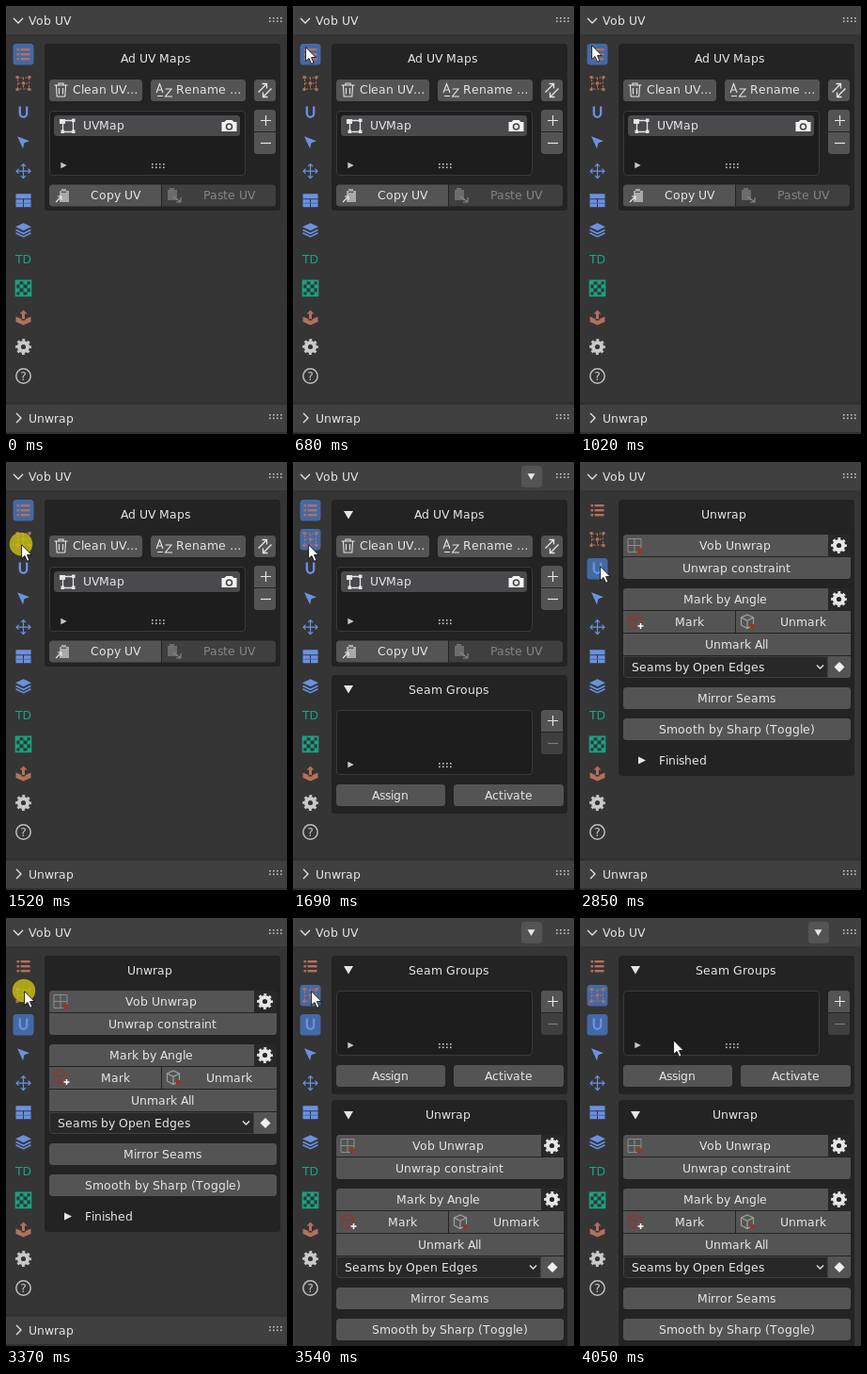
An HTML page that plays this animation: 299x454 px, repeating every 4.39 s.

```html
<!DOCTYPE html>
<html lang="en">
<head>
<meta charset="utf-8">
<title>UV panel</title>
<style>
  html, body { margin: 0; width: 100%; height: 100%; overflow: hidden; background: #353535; }
  svg { display: block; width: 100vw; height: 100vh; }
  text { font: 12.4px "DejaVu Sans", sans-serif; fill: #e6e6e6; white-space: pre; }
</style>
</head>
<body>
<svg id="stage" viewBox="0 0 299 454"></svg>
<script>
const LOOP = 4390;
const FG = '#e6e6e6', BTN = '#545454', OFF = '#3f3f3f', DARK = '#1d1d1d', HEAD = '#404040';
const ALL = 15, TOP = 3, BOTTOM = 12, LEFT = 9, RIGHT = 6, TL = 1, TR = 2, NONE = 0;

// Corner bits: 1 top left, 2 top right, 4 bottom right, 8 bottom left
function box(x, y, w, h, fill, corners = ALL, stroke = 'none') {
  const [a, b, c, d] = [1, 2, 4, 8].map(bit => corners & bit ? 3.5 : 0);
  return `<path fill="${fill}" stroke="${stroke}" d="M${x + a} ${y}H${x + w - b}q${b} 0 ${b} ${b}` +
    `V${y + h - c}q0 ${c} ${-c} ${c}H${x + d}q${-d} 0 ${-d} ${-d}V${y + a}q0 ${-a} ${a} ${-a}z"/>`;
}

// The interface font advances by whole pixels
const pen = document.createElement('canvas').getContext('2d');
pen.font = '12.4px "DejaVu Sans", sans-serif';
const advance = ch => Math.round(pen.measureText(ch).width);
const widthOf = s => [...s].reduce((sum, ch) => sum + advance(ch), 0);
function text(x, cy, s, fill = FG) {
  const xs = [...s].map(ch => (x += advance(ch)) - advance(ch));
  return `<text x="${xs.join(' ')}" y="${Math.round(cy + 4.5)}" style="fill:${fill}">${s}</text>`;
}
const mid = (x, cy, s, fill) => text(Math.floor(x - widthOf(s) / 2), cy, s, fill);
const glyph = (s, fill, font) =>
  `<text y="4.5" text-anchor="middle" style="fill:${fill};font:${font}">${s}</text>`;

const at = (x, y, s) => `<g transform="translate(${x} ${y})">${s}</g>`;
const line = (d, color = FG, w = 1.2) =>
  `<path d="${d}" fill="none" stroke="${color}" stroke-width="${w}"/>`;
const solid = (d, color = FG) => `<path d="${d}" fill="${color}"/>`;
const rect = (x, y, w, h, fill) => `<rect x="${x}" y="${y}" width="${w}" height="${h}" fill="${fill}"/>`;
const dot = (x, y, r, fill) => `<circle cx="${x}" cy="${y}" r="${r}" fill="${fill}"/>`;
const grid = (cols, rows, fn) => Array.from({ length: cols * rows },
  (_, i) => fn(i % cols, Math.floor(i / cols))).join('');

const btn = (x, y, w, label = '', corners = ALL, lx = x + w / 2) =>
  box(x, y, w, 23, BTN, corners) + mid(lx, y + 11, label);
const grip = (x, y) => grid(4, 2, (c, r) => rect(x + c * 4, y + r * 3.5, 1.6, 1.6, '#c4c4c4'));
const down = (x, y, s = 5) => solid(`M${x - s} ${y - s * .8}h${s * 2}l${-s} ${s * 1.7}z`);
const right = (x, y, s = 4, color = FG) => solid(`M${x - s} ${y - s}v${s * 2}l${s * 2} ${-s}z`, color);
const gear = (color = FG) =>
  `<g fill="none" stroke="${color}"><circle r="4.6" stroke-width="4"/>` +
  `<circle r="7.2" stroke-width="2.4" stroke-dasharray="2.9 2.755" stroke-dashoffset="1.4"/></g>`;
const gearBtn = y => box(264, y, 24, 23, '#282828', TR) + at(275.5, y + 11.5, gear());
const cube = color => line('M0-7 6.5-4V4L0 7.5-6.5 4V-4zM-6.5-4 0-.7 6.5-4M0-.7V7.5', color, 1.2);
const clip = color => solid('M-4-5H-2V-7H3V-5H6V7H-4z', color) +
  rect(-2, -4.3, 5, 1.3, '#505050') + line('M-8 7-2 1M-6 1h4v4', FG, 1.2);

function plusMinus(y, minusOn) {
  return box(264, y, 23, 23, BTN, TOP) + line(`M271 ${y + 11.5}h11M276.5 ${y + 6}v11`) +
    box(264, y + 24, 23, 23, minusOn ? BTN : OFF, BOTTOM) +
    line(`M271 ${y + 35.5}h11`, minusOn ? FG : '#7a7a7a');
}
const list = y => box(46.5, y + .5, 208, 68, DARK, ALL, '#3a3a3a') +
  right(61.5, y + 58, 3.2, '#c8c8c8') + grip(155, y + 56);
const panel = (y, h) => box(41, y, 251, h, '#232323');

const maps = panel(40, 177) +
  btn(46, 78, 99) + text(71, 88.5, 'Clean UV…') +
  at(58.5, 89, line('M-7-5H7M-2.5-5V-7H2.5V-5M-5-4.5-4.3 7H4.3L5-4.5M-2-2V4.5M2-2V4.5', FG, 1.1)) +
  btn(154, 78, 101) + text(181, 88.5, 'Rename …') +
  line('M160 92 163.5 82.5 167 92M161.2 89h4.6M169.5 88H176L169.5 96H177M161 95.5h6', FG, 1.1) +
  btn(264, 78, 23) +
  at(275.5, 89.5, line('M-7 2 2-7M-3-7H2V-2M7-2-2 7M3 7H-2V2', FG, 1.3)) +
  list(111) + box(51, 116, 198, 22, '#4a4a4d') +
  at(65, 127, line('M-4.5-5.5H6.5V6.5H-4.5z', FG, 1.3) + rect(-8, -7, 6, 5, FG) +
    rect(5, -7.5, 3.5, 3.5, FG) + rect(5, 4.5, 3.5, 3.5, FG) + rect(-6.5, 4.5, 3.5, 3.5, FG)) +
  text(82, 126.5, 'UVMap') +
  at(237.5, 127, solid('M-8-4H-5L-3-6H3L5-4H8V6H-8z', '#f2f2f2') +
    dot(0, 1, 3.8, '#444') + dot(0, 1, 2.2, '#f2f2f2')) +
  plusMinus(110, true) +
  btn(46, 189.5, 119, 'Copy UV', LEFT, 117) + at(61, 201, clip('#a9a9a9')) +
  box(166, 189.5, 121, 23, OFF, RIGHT) + mid(237.5, 200.5, 'Paste UV', '#858585') +
  at(179, 201, solid('M-7-6H-5V-8H0V-6H3V5H-7z', '#6c6c6c') + line('M-1 1 7 7M7 2V7H2', '#858585'));

const seams = panel(226, 147) + down(59, 241) + mid(165.5, 241, 'Seam Groups') +
  list(263) + plusMinus(263, false) +
  btn(46, 342, 116, 'Assign') + btn(171, 342, 117, 'Activate');

const RED = '#93352b';
const unwrap = panel(40, 293) +
  btn(46, 77, 218, 'Vob Unwrap', TL, 165.5) + gearBtn(77) +
  at(58, 88.5, line('M-7-7H7V7H-7zM0-7V7M-7 0H7', '#8c8c8c', 1) + rect(3, 3, 5, 5, RED)) +
  btn(46, 101, 242, 'Unwrap constraint', BOTTOM, 166.5) +
  btn(46, 134, 218, 'Mark by Angle', TL, 154.5) + gearBtn(134) +
  btn(46, 158, 119, 'Mark', NONE, 117) + btn(166, 158, 122, 'Unmark', NONE, 237.5) +
  at(58, 169, cube(RED) + line('M3.5 5h6M6.5 2v6', '#fff', 1.5)) +
  at(178, 169, cube('#a0a0a0') + rect(3, 3, 4.5, 4.5, RED)) +
  btn(46, 182, 242, 'Unmark All', NONE, 166.5) +
  box(46.5, 206.5, 217, 22, '#282828', 8, '#404040') + text(55, 217, 'Seams by Open Edges') +
  line('M252 215.5l3.5 3.5 3.5-3.5', FG, 1.4) +
  box(264, 206, 24, 23, BTN, 4) + solid('M276 212l5.5 5.5-5.5 5.5-5.5-5.5z', '#f0f0f0') +
  btn(46, 239, 242, 'Mirror Seams') + btn(46, 272, 242, 'Smooth by Sharp (Toggle)') +
  right(66, 316.5, 4) + text(84, 316, 'Finished');

const ORANGE = '#b3705b', BLUE = '#6a92e2', TEAL = '#17a582';
const icons = [
  grid(1, 3, (_, r) => rect(-7, -6 + r * 5, 2.6, 2.4, ORANGE) + rect(-3, -6 + r * 5, 10, 2.4, ORANGE)),
  `<g stroke-dasharray="2.5 1.5">${line('M-6-6H6V6H-6zM-6 0H0V6M0-6V0H6', ORANGE, 1)}</g>` +
    grid(3, 3, (c, r) => (c + r) % 2 ? '' : rect(-8 + c * 6.5, -8 + r * 6.5, 3, 3, ORANGE)),
  line('M-3.7-6.5V1a3.7 3.7 0 0 0 7.4 0V-6.5', BLUE, 2.3),
  solid('M-6.5-6 6.5-1 1 1-.5 7z', BLUE),
  line('M-7 0H7M0-7V7M-5-2.5-7.5 0-5 2.5M5-2.5 7.5 0 5 2.5M-2.5-5 0-7.5 2.5-5M-2.5 5 0 7.5 2.5 5', BLUE, 1.2),
  rect(-8, -7, 16, 5, BLUE) + rect(-8, -1, 7.5, 8, BLUE) + rect(.5, -1, 7.5, 8, BLUE) +
    line('M-8 3H8', '#4a68a6', 1),
  solid('M0-7 8.5-3 0 1-8.5-3z', BLUE) + line('M-8 .2 0 4 8 .2M-8 3.5 0 7.3 8 3.5', BLUE, 1.6),
  glyph('TD', TEAL, 'bold 13px "Noto Sans", sans-serif'),
  line('M-8-8H8V8H-8z', TEAL, 1.6) +
    grid(4, 4, (c, r) => (c + r) % 2 ? '' : rect(-8 + c * 4, -8 + r * 4, 4, 4, TEAL)),
  solid('M-8-1-2 1.5V3H2V1.5L8-1V4.5L0 8-8 4.5z', ORANGE) + solid('M0-8 4-4H1.5V1.5h-3V-4H-4z', ORANGE),
  gear('#c9c9c9'),
  `<circle r="7.7" fill="none" stroke="#bdbdbd" stroke-width="1.5"/>` +
    glyph('?', '#c9c9c9', 'bold 12px "DejaVu Sans", sans-serif')
];
const tabs = icons.map((icon, i) => at(18.5, 51 + i * 31.05,
  (i < 3 ? `<g id="tab${i}">${box(-11, -11, 22, 22.5, '#4469a6')}</g>` : '') + icon)).join('');

const byId = id => document.getElementById(id);
byId('stage').innerHTML =
  rect(0, 0, 299, 454, '#353535') + rect(0, 0, 299, 30, HEAD) +
  line('M8 13l5 5 5-5', FG, 1.3) + text(24, 15, 'Vob UV') + grip(280, 12) +
  `<g id="menu">${box(243, 4, 22, 23, BTN)}${down(253.5, 15.5, 4)}</g>` + tabs +
  `<g id="maps">${maps}<g id="fold">${down(59, 56)}</g>` +
    `<g id="mapsTitle">${text(0, 55, 'Ad UV Maps')}</g></g>` +
  `<g id="seams">${seams}</g>` +
  `<g id="unwrap">${unwrap}<g id="unwrapFold">${down(59, 56)}</g>` +
    `<g id="unwrapTitle">${text(0, 55, 'Unwrap')}</g></g>` +
  `<g id="footer">${rect(0, 420, 299, 34, '#303030')}${rect(0, 423, 299, 29, HEAD)}` +
    line('M11 432l5 5-5 5', FG, 1.3) + text(24, 437, 'Unwrap') + grip(280, 433) + `</g>` +
  `<g id="pointer"><circle id="click" r="12.3" fill="#c8be14" opacity=".82"/>` +
  `<path d="M.6 .8V15.6L4 12.5 6.6 18.3 9 17.2 6.5 11.6H11.2z" fill="#fff" stroke="#111" stroke-width=".9"/></g>`;

// Pointer poses: start ms, tip x, tip y, pressed
const poses = [
  [170, 89, 216], [340, 9, 102], [510, 24, 69], [680, 13, 43], [850, 12, 41, 1], [1020, 12, 41],
  [1180, 16, 81], [1350, 16, 87], [1520, 16, 87, 1], [1690, 16, 87], [2190, 13, 89], [2350, 21, 110],
  [2680, 21, 110, 1], [2850, 21, 110], [3020, 23, 80], [3200, 21, 78], [3370, 19, 77, 1],
  [3540, 19, 77], [3710, 35, 88], [3880, 92, 118], [4050, 99, 129]
];
const scenes = [
  { start: 0, tabs: [0] },
  { start: 1690, tabs: [0, 1] },
  { start: 2850, tabs: [2] },
  { start: 3540, tabs: [1, 2] }
];

const show = (id, on) => byId(id).setAttribute('display', on ? 'inline' : 'none');
const move = (id, x, y) => byId(id).setAttribute('transform', `translate(${x} ${y})`);

function render(t) {
  const open = scenes.findLast(s => s.start <= t).tabs;
  const many = open.length > 1, has = i => open.includes(i);
  ['maps', 'seams', 'unwrap'].forEach((id, i) => {
    show(id, has(i));
    show('tab' + i, has(i));
  });
  ['menu', 'fold', 'unwrapFold'].forEach(id => show(id, many));
  show('footer', !(many && has(2)));
  move('seams', 0, has(0) ? 0 : -186);
  move('unwrap', 0, many ? 153 : 0);
  move('mapsTitle', many ? 129 : 122, 0);
  move('unwrapTitle', many ? 141 : 129, 0);

  const pose = poses.findLast(p => p[0] <= t);
  show('pointer', !!pose);
  if (pose) {
    move('pointer', pose[1], pose[2]);
    show('click', pose[3]);
  }
}

const born = performance.now();
function tick() {
  render((performance.now() - born) % LOOP);
  requestAnimationFrame(tick);
}
tick();
</script>
</body>
</html>
```
